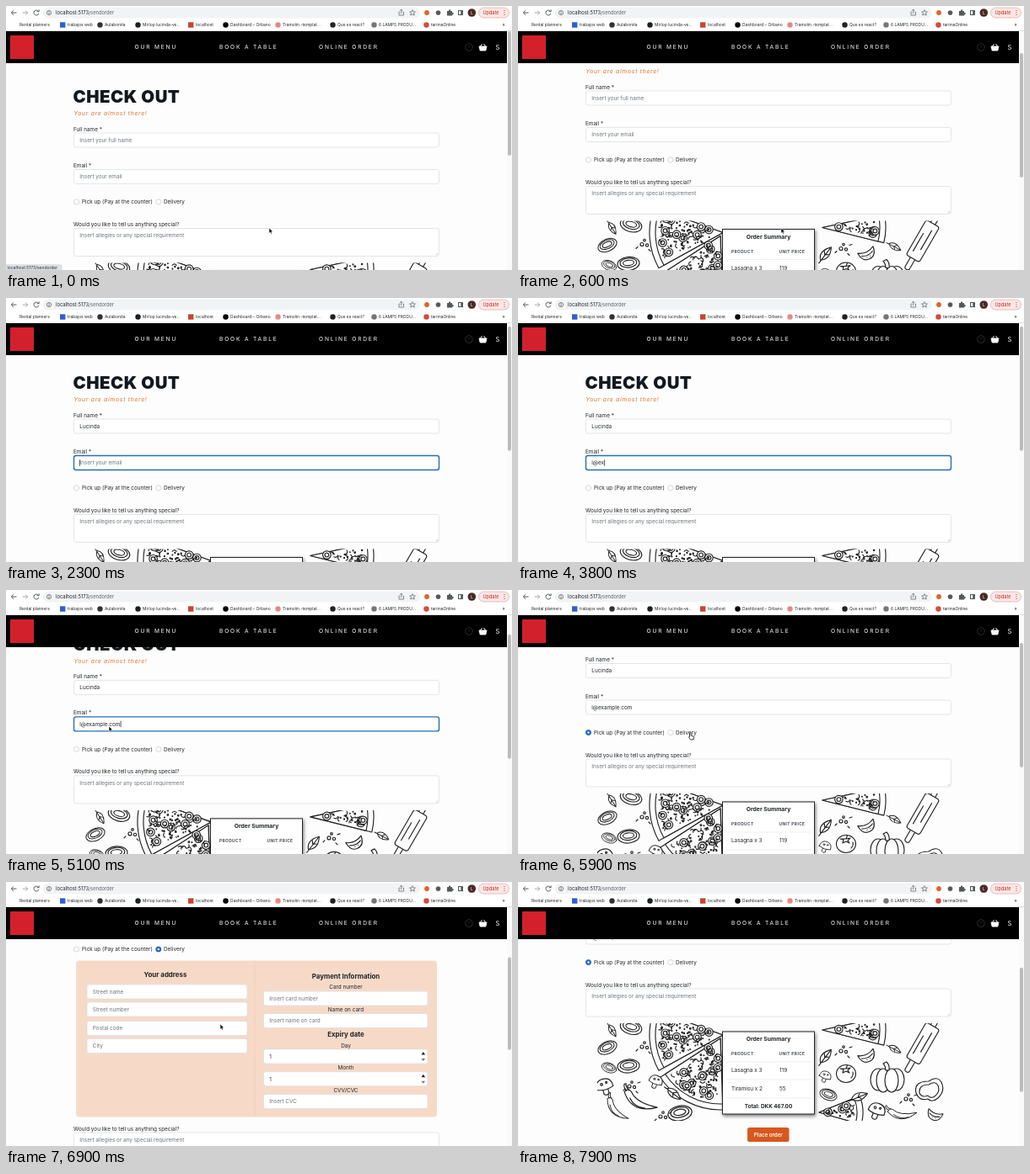
These frames come from a looping animation (600x314 px, 8 s). An HTML page:

```html
<!DOCTYPE html>
<html lang="en">
<head>
<meta charset="utf-8">
<title>Check out</title>
<style>
html, body { margin: 0; width: 100%; height: 100%; overflow: hidden; background: #fff; }
svg { display: block; width: 600px; height: 314px; font-family: Inter, "Open Sans", sans-serif; }
text { fill: #212529; white-space: pre; }
.hint { fill: #6c757d; }
.mid { text-anchor: middle; }
.bold { font-weight: 700; }
.box { fill: #fff; stroke: #dcdfe3; stroke-width: .8; }
.focus { stroke: #2a6db5; stroke-width: 1.4; }
.nav { fill: #fff; letter-spacing: 1.85px; }
.line { fill: none; stroke: #55595e; stroke-width: 1; }
.thin { fill: none; stroke: #55595e; stroke-width: .7; }
.doodle { fill: #fff; stroke: #222; stroke-width: 1.15; stroke-linejoin: round; stroke-linecap: round; }
</style>
</head>
<body>
<svg id="stage" viewBox="0 0 600 314"></svg>
<script>
const LOOP = 8000, EXTRA = 186.5;
const NAME = 'Lucinda', EMAIL = 'l@example.com';
const stage = document.getElementById('stage');

// y is the vertical middle of the text
const text = (x, y, s, size = 6.4, attr = '') =>
  `<text x="${x}" y="${y + size * .36}" font-size="${size}" ${attr}>${s}</text>`;
const rect = (x, y, w, h, attr = '') =>
  `<rect x="${x}" y="${y}" width="${w}" height="${h}" ${attr}/>`;
const circle = (x, y, r, attr = '') => `<circle cx="${x}" cy="${y}" r="${r}" ${attr}/>`;
const oval = (x, y, rx, ry, attr = '') => `<ellipse cx="${x}" cy="${y}" rx="${rx}" ry="${ry}" ${attr}/>`;
const path = (d, attr = '') => `<path d="${d}" ${attr}/>`;
const at = (x, y, turn, body, scale = 1) =>
  `<g transform="translate(${x} ${y}) rotate(${turn}) scale(${scale})">${body}</g>`;
const field = (x, y, w, hint, id = '', h = 17) =>
  rect(x, y, w, h, `rx="2.5" class="box" id="${id}Box"`) +
  text(x + 6.8, y + 8.6, hint, 6.4, `class="hint" id="${id}Text"`);
const radio = (x, id) => `<g id="${id}">${circle(x, 233, 3.1, 'class="box"')}${circle(x, 233, 1.2, 'fill="#fff"')}</g>`;

let seed = 7;
const rnd = () => (seed = seed * 16807 % 2147483647) / 2147483647;

function polar(r, deg) {
  const a = deg * Math.PI / 180;
  return [r * Math.cos(a), r * Math.sin(a)].map(v => +v.toFixed(1));
}

// Pizza sector with its tip at the local zero point
function slice(r, a, b, bits) {
  const arc = q => path(`M0 0L${polar(q, a)}A${q} ${q} 0 0 1 ${polar(q, b)}Z`);
  let out = arc(r) + arc(r - 7);
  for (let i = 0; i < bits; i++) {
    const [x, y] = polar((r - 11) * Math.sqrt(.05 + .95 * rnd()), a + 5 + (b - a - 10) * rnd());
    out += i % 10 === 0 ? circle(x, y, 4.8) + circle(x, y, 2.4)
      : i % 3 ? circle(x, y, .3 + rnd() * .6)
      : at(x, y, Math.round(rnd() * 360), path('M-2.5 0q2.5 -3 5 0', 'fill="none"'));
  }
  return out;
}

const ring = oval(0, 0, 13, 8) + oval(0, -1, 10, 5.6) + oval(0, -1, 6.5, 3.2);
const tomato = oval(0, 0, 11.5, 10.5) + path('M0 -6l1.5 -4M0 -6l5 -1l-3 3l2 3l-4 -2l-4 2l1 -4l-4 -1z') +
  path('M6 5q3 -3 2 -7', 'fill="none"');
const pumpkin = oval(-11, 0, 9, 13) + oval(11, 0, 9, 13) + oval(-5, 1, 8, 14) + oval(5, 1, 8, 14) +
  path('M-2 -11q0 -5 -3 -8l4 -2q4 4 3 10z');
const mushroom = path('M-3 0v8q3 3 6 0v-8z') + path('M-10 1q0 -11 10 -11t10 11q-10 4 -20 0z') + circle(-3, -4, 1.3) + circle(3, -5, 1);
const leaf = path('M-10 0q7 -9 20 0q-12 9 -20 0zM-14 1l22 -1M-2 0l3 -3M-2 0l3 3');
const pepper = path('M0 -12q10 -7 15 1q5 10 -4 19q-7 6 -12 1q-10 3 -14 -7q-3 -14 15 -14z') +
  path('M0 -8q8 -5 11 1q3 8 -4 13q-5 3 -8 -1q-7 3 -10 -3q-1 -10 11 -10z');
const chili = path('M-22 -8q3 -6 8 -2q8 12 34 12q-28 14 -42 -10z') +
  path('M-20 -10q-4 -2 -4 -7l2 -1q0 4 5 7M-14 -2q8 10 20 8', 'fill="none"');
const pin = rect(-39, -3, 78, 6, 'rx="3"') + rect(-24, -9, 48, 18, 'rx="3"') + path('M-16 -4h24M-10 3h26');
const wedge = path('M-10 -5q10 6 20 0q-1 12 -10 12t-10 -12z') + path('M-7 0q7 4 14 0M-2 4h.1M2 4h.1', 'fill="none"');
const peas = circle(-3, 0, 2) + circle(3, 1, 1.6) + circle(0, -5, 1.3) + path('M-8 3l-2 2M7 -4l3 -1M5 6l2 2');

const doodles = `<clipPath id="art"><rect x="94" y="168" width="413" height="116"/></clipPath>
<g transform="translate(0 137.5)"><g class="doodle" clip-path="url(#art)">` +
  at(134, 173, 15, ring) + at(106, 197, -25, ring, .9) + at(131, 219, -5, ring) +
  at(108, 221, 20, ring, .7) + at(150, 196, 0, peas) + at(112, 177, 60, leaf, .8) +
  at(243, 182, 0, slice(87, 151, 200, 110)) + at(240, 186, 0, slice(85, 88, 147, 130)) +
  at(103, 244, -15, mushroom) + at(163, 238, 20, mushroom, .8) + at(135, 243, 0, peas) +
  at(146, 262, 12, chili) + at(118, 272, 30, chili, .8) + at(185, 252, 40, leaf) +
  at(192, 275, -10, ring, 1.1) + at(172, 279, 0, peas) +
  at(361, 176, 0, slice(75, -12, 14, 34)) + at(365, 207, -50, leaf) + at(386, 201, 0, peas) +
  at(414, 207, -25, wedge) + at(389, 228, 0, tomato) + at(364, 232, 20, mushroom, .7) +
  at(438, 235, 0, pumpkin) + at(480, 192, -60, pin) + at(447, 199, 30, leaf, .8) +
  at(487, 249, 0, pepper) + at(463, 258, 0, peas) + at(368, 253, 20, ring, .8) +
  at(357, 274, 0, slice(52, -22, 16, 30)) + at(405, 255, -20, leaf) +
  at(425, 273, 20, mushroom) + at(457, 276, -12, chili, .8) + at(494, 277, 20, wedge, .9) +
  '</g></g>';

const summary = rect(242.5, 315.5, 109, 98, 'fill="#fff" stroke="#222" style="filter:drop-shadow(1.5px 2px 2px #0008)"') +
  text(297, 324.3, 'Order Summary', 6.8, 'class="mid bold"') +
  text(253, 342, 'PRODUCT', 4.8, 'class="bold" letter-spacing=".4" style="fill:#444b55"') +
  text(309.5, 342, 'UNIT PRICE', 4.8, 'class="bold" letter-spacing=".4" style="fill:#444b55"') +
  path('M247 351.5h100M247 372.5h100M247 394.5h100', 'stroke="#e9e9e9" stroke-width=".7"') +
  text(253, 361.4, 'Lasagna x 3') + text(310, 361.4, '119') +
  text(253, 383.5, 'Tiramisu x 2') + text(310, 383.5, '55') +
  text(297, 404, 'Total: DKK 467.00', 6.4, 'class="mid bold"') +
  rect(272, 429.5, 49.5, 17, 'rx="2.5" fill="#d6581c"') +
  text(296.8, 438, 'Place order', 6.2, 'class="mid" font-weight="600" style="fill:#fff"');

const spinner = y => path(`M492.5 ${y - 2}l2.3 -3.5l2.3 3.5z`, 'fill="#222"') + path(`M492.5 ${y + 2.5}l2.3 3l2.3 -3z`, 'fill="#777"');
const number = y => field(305.5, y, 194.5, '<tspan fill="#212529">1</tspan>') + spinner(y + 8.5);
const mid = (x, y, s, bold) => text(x, y, s, bold ? 7.9 : 6.4, `class="mid ${bold ? 'bold' : ''}"`);

const delivery = '<g id="delivery" transform="translate(0 153)">' +
  rect(83, 93.5, 428, 186, 'rx="4" fill="#f6dac7"') + path('M295 94v185', 'stroke="#ecccb8" stroke-width=".8"') +
  mid(189, 110, 'Your address', true) +
  field(96, 122, 190, 'Street name') + field(96, 143, 190, 'Street number') +
  field(96, 165.5, 190, 'Postal code') + field(96, 186.5, 190, 'City') +
  mid(403, 112, 'Payment Information', true) +
  mid(403, 125, 'Card number') + field(305.5, 130, 194.5, 'Insert card number') +
  mid(403, 152, 'Name on card') + field(305.5, 156.5, 194.5, 'Insert name on card') +
  mid(403, 181.5, 'Expiry date', true) +
  mid(403, 194.5, 'Day') + number(199) + mid(403, 221, 'Month') + number(225.8) +
  mid(403, 247.5, 'CVV/CVC') + field(305.5, 252.5, 194.5, 'Insert CVC') + '</g>';

const page = '<g id="page">' +
  text(79.5, 108, 'CHECK OUT', 20.4, 'font-weight="900" letter-spacing=".5" style="fill:#12181f"') +
  text(80.5, 128, 'Your are almost there!', 6.8, 'font-style="italic" letter-spacing=".72" style="fill:#e0702f"') +
  text(80, 146.5, 'Full name *') + field(80.5, 151, 433, '', 'name') +
  text(80, 189.7, 'Email *') + field(80.5, 194.5, 433, '', 'email') +
  rect(0, 0, .7, 7.5, 'id="caret" fill="#111"') +
  radio(83.5, 'pickup') + text(90, 233, 'Pick up (Pay at the counter)') +
  radio(180.8, 'deliver') + text(187, 233, 'Delivery') + delivery +
  '<g id="lower">' + text(80, 259.7, 'Would you like to tell us anything special?') +
  field(80.5, 264.5, 433, 'Insert allegies or any special requirement', 'note', 33) +
  path('M510 296l2 -2M511.3 296.2l.8 -.8', 'stroke="#888" stroke-width=".5"') +
  doodles + summary + '</g></g>';

const bookmarks = [
  [16, 'Rental planners'], [73, 'trabajos web', '#2f5fd0', 1], [117, 'Aulabonita', '#333'],
  [162, 'Mirlop lucinda-ve...', '#1b1f23'], [225, 'localhost', '#c8452e', 1],
  [266, 'Dashboard – Orbano', '#000'], [328, 'Tramolin -templat...', '#e58a84'],
  [393, 'Que es react?', '#222'], [442, '6 LAMPS PRODU...', '#777'], [504, 'tarimaOnline', '#d9463b']
].map(([x, s, color, square]) => text(x, 22.5, s, 4.9) +
  (!color ? '' : square ? rect(x - 9, 19.3, 6.4, 6.4, `fill="${color}"`) : circle(x - 5.5, 22.5, 3.2, `fill="${color}"`))).join('');

const browser = rect(0, 0, 600, 30, 'fill="#fff"') + rect(44, 1.5, 447, 13, 'rx="6.5" fill="#f1f3f4"') +
  path('M12.5 8h-6m2.5 -2.7l-2.7 2.7l2.7 2.7', 'class="line"') +
  path('M19.5 8h6m-2.5 -2.7l2.7 2.7l-2.7 2.7', 'class="line" opacity=".5"') +
  path('M38.5 6.3a3 3 0 1 0 .4 2.5m.2 -4.5v2.4h-2.4', 'class="line"') +
  circle(51, 8, 2.6, 'class="thin"') + path('M51 7.6v1.9M51 6.2v.6', 'class="line"') +
  text(59, 8, 'localhost:5173<tspan fill="#60646a">/sendorder</tspan>', 5.8) +
  path('M467 7h-1v4h5.5v-4h-1M468.7 9v-5m-1.5 1.5l1.5 -1.5l1.5 1.5', 'class="thin"') +
  path('M482 4.6l1 2.2l2.4 .2l-1.8 1.6l.6 2.4l-2.2 -1.3l-2.2 1.3l.6 -2.4l-1.8 -1.6l2.4 -.2z', 'class="thin"') +
  circle(499, 8, 2.9, 'fill="#e2622b"') + circle(512.5, 8, 2.8, 'fill="#55595e"') +
  path('M523 6h2a1.2 1.2 0 1 1 2.2 0h1.8v2a1.2 1.2 0 1 1 0 2.2v1.3h-6z', 'fill="#55595e"') +
  rect(536.5, 5.5, 5, 5, 'class="line"') + rect(539.3, 5.5, 2.2, 5, 'fill="#55595e"') +
  circle(552.3, 8, 4.8, 'fill="#4b2a2a"') + text(552.3, 8, 'L', 4.8, 'class="mid" style="fill:#fff"') +
  rect(560.5, 2, 36, 12, 'rx="6" fill="#fce8e6" stroke="#e3a49e" stroke-width=".7"') +
  text(565.5, 8, 'Update', 5.5, 'style="fill:#c5221f"') +
  [5.5, 8, 10.5].map(y => circle(591, y, .6, 'fill="#c5221f"')).join('') +
  bookmarks + text(588.5, 22.3, '»', 5.5) + rect(0, 29, 600, 1, 'fill="#dcdcdc"');

const header = rect(0, 30, 594, 38) + rect(5, 35, 28, 28, 'fill="#d3202b"') +
  [[152.5, 'OUR MENU'], [253, 'BOOK A TABLE'], [371, 'ONLINE ORDER']].map(([x, s]) => text(x, 49, s, 6.6, 'class="nav"')).join('') +
  circle(549, 49, 4.3, 'fill="none" stroke="#2b2b2b"') + text(549, 49, '?', 5, 'class="mid" style="fill:#333"') +
  path('M561 48h9l-1.2 5h-6.6zM562.5 48l2 -3M568.5 48l-2 -3', 'fill="#fff" stroke="#fff" stroke-width=".9"') +
  text(580.5, 49, 'S', 7.5, 'style="fill:#fff"');

stage.innerHTML = rect(0, 0, 600, 314, 'fill="#fdfdfd"') + page + header + browser +
  rect(594, 30, 6, 284, 'fill="#fafafa"') + rect(595, 30, 4, 148, 'id="thumb" rx="2" fill="#bcbcbc"') +
  '<g id="status">' + rect(-1, 307.8, 67, 8, 'rx="1.5" fill="#dfe1e5" stroke="#c4c7cb" stroke-width=".5"') +
  text(1.5, 311.6, 'localhost:5173/sendorder', 5) + '</g><g id="mouse">' +
  path('M0 0v6.3l1.5 -1.3l1 2.3l1.1 -.5l-1 -2.2h2z', 'id="arrow" stroke="#fff" stroke-width=".6"') +
  path('M-.5 .5q1 -1.2 1.6 .2v2.5l3 .8q.8 .4 .6 1.5l-.6 2.5h-3.6l-2 -3q.2 -1 1 -.5z', 'id="hand" fill="#fff" stroke="#111" stroke-width=".8"') + '</g>';

const $ = id => document.getElementById(id);
const scrollKeys = [[0, 0], [400, 46], [600, 50], [900, 7], [4800, 7], [5300, 63.5], [6300, 63.5], [6800, 153], [7500, 153], [7800, 137.5]];
const mouseKeys = [[0, 312, 264], [1000, 312, 264], [1300, 160, 154], [4800, 160, 154], [5400, 84, 170],
  [5500, 84, 170], [5900, 204, 170], [6300, 204, 170], [6800, 254, 169], [7000, 254, 169], [7400, 84, 80]];
const emailKeys = [2800, 3200, 3400, 3600, ...Array.from({ length: 9 }, (_, i) => 3900 + i * 100)];
const nameKeys = Array.from(NAME, (_, i) => 1500 + i * 100);

function track(keys, t) {
  const i = keys.findIndex(k => k[0] > t);
  if (i < 0) return keys[keys.length - 1].slice(1);
  const a = keys[i - 1], b = keys[i], p = (t - a[0]) / (b[0] - a[0]), e = p * p * (3 - 2 * p);
  return a.slice(1).map((v, n) => v + (b[n + 1] - v) * e);
}

const show = (id, on) => $(id).setAttribute('visibility', on ? 'visible' : 'hidden');
const move = (id, x, y) => $(id).setAttribute('transform', `translate(${x} ${y})`);

function setField(id, value, hint, keys, focusAt, blurAt, t) {
  const focused = t >= focusAt && t < blurAt, node = $(id + 'Text');
  const typed = value.slice(0, keys.filter(k => k <= t).length);
  node.textContent = typed || hint;
  node.setAttribute('class', typed ? '' : 'hint');
  $(id + 'Box').setAttribute('class', focused ? 'box focus' : 'box');
  if (!focused) return false;
  const last = Math.max(focusAt, ...keys.filter(k => k <= t));
  $('caret').setAttribute('x', 87.3 + (typed ? node.getComputedTextLength() + .3 : 0));
  $('caret').setAttribute('y', id === 'name' ? 155.8 : 199.3);
  return (t - last) % 1000 < 500;
}

function setRadio(id, on) {
  const dot = $(id).firstChild;
  dot.style.fill = on ? '#1f66c1' : '#fff';
  dot.style.stroke = on ? '#1f66c1' : '#c9cdd2';
}

function draw(t) {
  const [scroll] = track(scrollKeys, t), [x, y] = track(mouseKeys, t);
  const open = t >= 6200 && t < 7500;
  move('page', 0, -scroll);
  move('lower', 0, open ? EXTRA : 0);
  show('delivery', open);
  setRadio('pickup', t >= 5500 && !open);
  setRadio('deliver', open);

  const inName = setField('name', NAME, 'Insert your full name', nameKeys, 1300, 2200, t);
  const inEmail = setField('email', EMAIL, 'Insert your email', emailKeys, 2200, 5500, t);
  show('caret', inName || inEmail);

  const ratio = 284 / (545 + (open ? EXTRA : 0));
  $('thumb').setAttribute('y', 30 + scroll * ratio);
  $('thumb').setAttribute('height', 284 * ratio);

  const visible = t < 1500 || (t >= 4800 && t < 7700);
  const hand = (t >= 5400 && t < 6500) || t >= 7400;
  move('mouse', x, y);
  show('arrow', visible && !hand);
  show('hand', visible && hand);
  show('status', t < 300);
}

function frame(now) {
  draw(Math.floor(now % LOOP / 100) * 100);
  requestAnimationFrame(frame);
}
draw(0);
requestAnimationFrame(frame);
</script>
</body>
</html>
```
